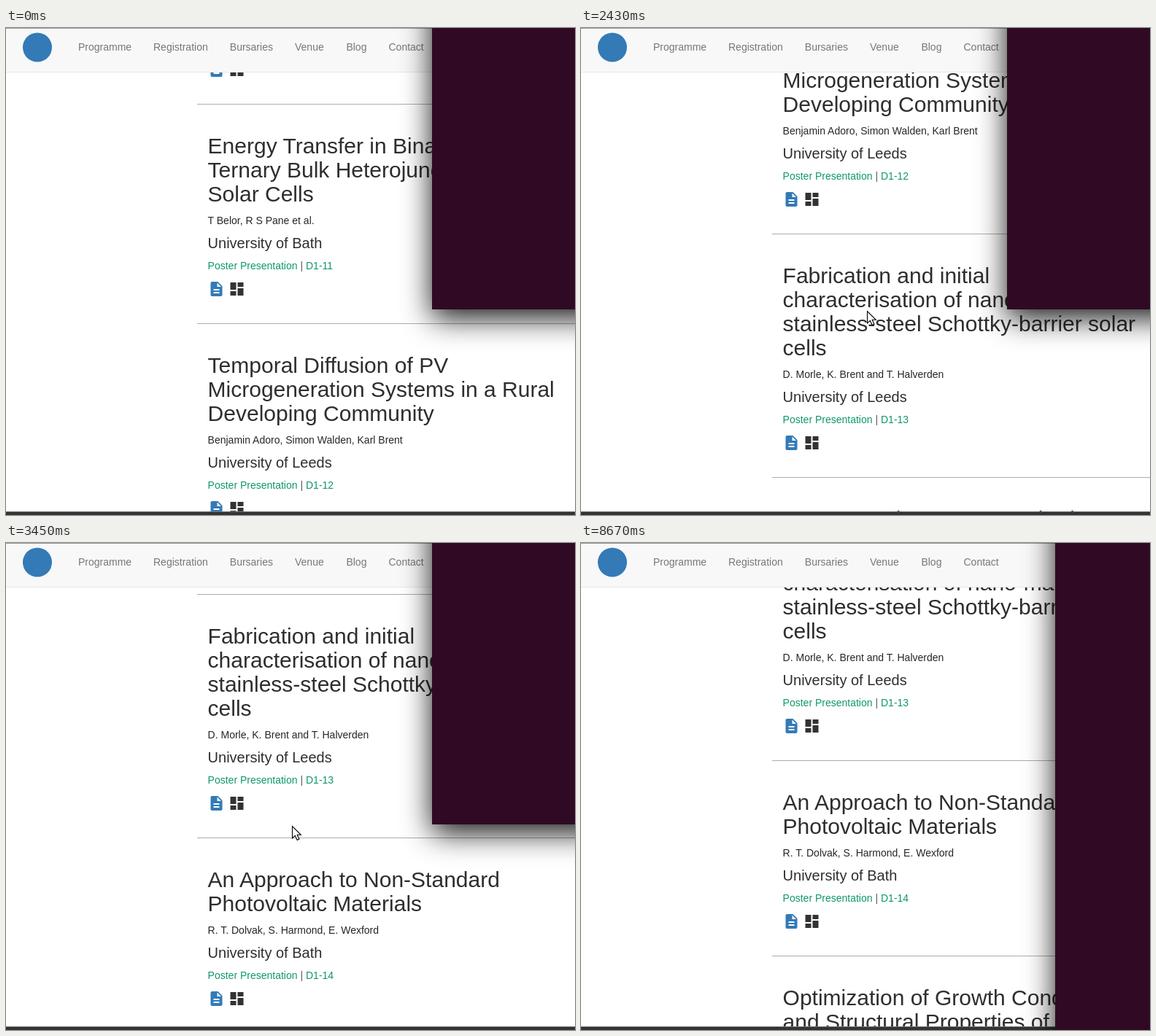
Animation of 780 by 668 pixels, one loop 9.73 s. Source, as an HTML page:

```html
<!DOCTYPE html>
<html lang="en">
<head>
<meta charset="utf-8">
<title>Poster list</title>
<style>
  html, body { margin: 0; width: 100%; height: 100%; overflow: hidden; background: #fff; }
  svg { display: block; font-family: "Liberation Sans", Arial, sans-serif; }
  .nav { font-size: 14px; fill: #777; }
  .title { font-size: 30px; fill: #2e2e2e; }
  .people { font-size: 14px; fill: #262626; }
  .place { font-size: 20px; fill: #2e2e2e; }
  .slot { font-size: 14px; fill: #0f9868; }
</style>
</head>
<body>
<svg id="stage" width="780" height="668" viewBox="0 0 780 668">
  <defs>
    <clipPath id="view"><rect y="61" width="780" height="602"/></clipPath>
    <filter id="blur" filterUnits="userSpaceOnUse" x="400" y="-300" width="900" height="1400">
      <feGaussianBlur stdDeviation="20"/>
    </filter>
    <path id="doc" fill="#337ab7" d="M14 2H6c-1.1 0-2 .9-2 2v16c0 1.1.9 2 2 2h12c1.1 0 2-.9 2-2V8zm2 16H8v-2h8zm0-4H8v-2h8zm-3-5V3.5L18.5 9z"/>
    <path id="board" fill="#333" d="M3 13h8V3H3zm0 8h8v-6H3zm10 0h8V11h-8zm0-18v6h8V3z"/>
  </defs>
  <rect width="780" height="668" fill="#fff"/>
  <g clip-path="url(#view)"><g id="page"></g></g>
  <rect width="780" height="60" fill="#f8f8f8"/>
  <rect y="60" width="780" height="1" fill="#e7e7e7"/>
  <rect width="780" height="1" fill="#999"/>
  <circle cx="43" cy="26.5" r="20" fill="#337ab7"/>
  <g id="nav"></g>
  <rect y="663" width="780" height="1" fill="#777"/>
  <rect y="664" width="780" height="4" fill="#333"/>
  <rect id="shadow" y="-140" width="600" fill="#000" fill-opacity=".9" filter="url(#blur)"/>
  <rect id="term" y="-140" width="600" fill="#300a24"/>
  <path id="arrow" d="M0 0V16.5L3.9 12.9L6.7 19L9.4 17.8L6.7 11.8H11.8Z" fill="#fff" stroke="#000" stroke-width="1.1"/>
  <g id="beam" fill="none">
    <path d="M-3-8H-1L0-7L1-8H3M0-7V7M-3 8H-1L0 7L1 8H3" stroke="#fff" stroke-width="3.4"/>
    <path d="M-3-8H-1L0-7L1-8H3M0-7V7M-3 8H-1L0 7L1 8H3" stroke="#000" stroke-width="1.5"/>
  </g>
</svg>
<script>
const LOOP = 9730, NOTCH = 106, LEFT = 276.6;
const $ = id => document.getElementById(id);

const menu = [["Programme", 99], ["Registration", 202], ["Bursaries", 306.8],
  ["Venue", 396], ["Blog", 466.4], ["Contact", 524.5]];

const posters = [
  { title: ["Energy Transfer in Binary and", "Ternary Bulk Heterojunction", "Solar Cells"],
    people: "T Belor, R S Pane et al.", place: "University of Bath", slot: "D1-11" },
  { title: ["Temporal Diffusion of PV", "Microgeneration Systems in a Rural", "Developing Community"],
    people: "Benjamin Adoro, Simon Walden, Karl Brent", place: "University of Leeds", slot: "D1-12" },
  { title: ["Fabrication and initial", "characterisation of nano-material", "stainless-steel Schottky-barrier solar", "cells"],
    people: "D. Morle, K. Brent and T. Halverden", place: "University of Leeds", slot: "D1-13" },
  { title: ["An Approach to Non-Standard", "Photovoltaic Materials"],
    people: "R. T. Dolvak, S. Harmond, E. Wexford", place: "University of Bath", slot: "D1-14" },
  { title: ["Optimization of Growth Conditions", "and Structural Properties of", "Cu(In,Ga)Se_2 Thin Films Prepared", "by Selenization Method"],
    people: "Samira AlNoury, Ling-Wei Tsaong and Robert K. Melod" }
];

// Wheel bursts: start, end, and the notch reached at each even step
const bursts = [
  [1530, 1660, "12"], [1770, 2110, "345654321"], [2150, 2470, "23456543"],
  [2730, 2930, "45678"], [2980, 3450, "7654323456"], [3500, 3700, "7876"],
  [3740, 3820, "567"]
];

// Pointer path: time, x, y
const moves = [[1040, 52.5, 502], [1080, 215, 444], [1120, 345, 402], [1160, 392.5, 388.5],
  [4920, 468, 350], [4960, 631, 266]];

const textRows = [];

function text(cls, x, y, str) {
  const body = str.replace(/_(\d)(.*)/, '<tspan font-size="22.5" dy="5.6">$1</tspan><tspan dy="-5.6">$2</tspan>');
  return `<text class="${cls}" x="${x}" y="${y}">${body}</text>`;
}

function row(cls, y, str, size) {
  textRows.push({ mid: y - size / 3, half: size * 0.52, right: LEFT + str.length * size / 2 });
  return text(cls, LEFT, y, str);
}

function icons(y) {
  return `<use href="#doc" x="276.5" y="${y}"/><use href="#board" x="304.5" y="${y}"/>`;
}

function buildPage() {
  let top = 104, out = icons(45);
  for (const p of posters) {
    out += `<rect x="262" y="${top}" width="518" height="1" fill="#b3a9a9"/>`;
    p.title.forEach((line, i) => out += row("title", top + 68 + 33 * i, line, 30));
    const last = top + 35 + 33 * p.title.length;
    out += row("people", last + 31, p.people, 14);
    if (p.slot) {
      out += row("place", last + 64, p.place, 20);
      out += row("slot", last + 93, `Poster Presentation <tspan fill="#555">|</tspan> ${p.slot}`, 14);
      out += icons(last + 108);
    }
    top = last + 167;
  }
  $("page").innerHTML = out;
  $("nav").innerHTML = menu.map(([s, x]) => text("nav", x, 31, s)).join("");
}

function scrollAt(t) {
  const b = bursts.filter(b => t >= b[0]).pop();
  if (!b) return 0;
  const [start, end, levels] = b, last = levels.length - 1;
  const i = Math.min(last, Math.floor((t - start) / (end - start) * last + 1e-6));
  return levels[i] * NOTCH;
}

function overText(x, y, scroll) {
  return x > 584 || textRows.some(r =>
    x >= LEFT && x < r.right && Math.abs(y + scroll - r.mid) <= r.half);
}

function place(id, visible, x, y) {
  $(id).setAttribute("visibility", visible ? "visible" : "hidden");
  $(id).setAttribute("transform", `translate(${x} ${y})`);
}

function draw(t) {
  const scroll = scrollAt(t);
  $("page").setAttribute("transform", `translate(0 ${-scroll})`);

  const moved = t >= 8670, x = moved ? 650 : 584, h = moved ? 1000 : 526;
  $("term").setAttribute("x", x);
  $("term").setAttribute("height", h);
  $("shadow").setAttribute("x", x);
  $("shadow").setAttribute("height", h + 12);

  const shown = t >= 1040 && t < 5000;
  const [, px, py] = moves.filter(m => t >= m[0]).pop() || moves[0];
  const isBeam = overText(px + 2.5, py + 1.5, scroll);
  place("arrow", shown && !isBeam, px, py);
  place("beam", shown && isBeam, px + 2.5, py + 1.5);
}

buildPage();
const begin = performance.now();
function tick() {
  draw((performance.now() - begin) % LOOP);
  requestAnimationFrame(tick);
}
tick();
</script>
</body>
</html>
```
